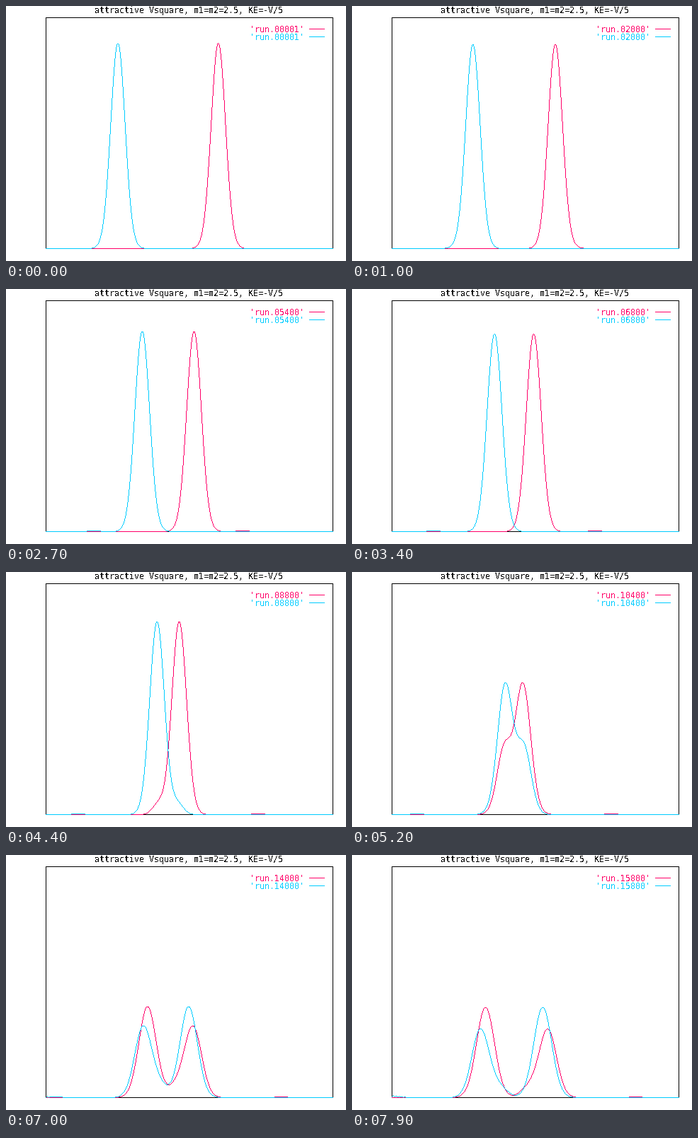
A matplotlib script that plays this animation: 480 by 360 pixels, repeating every 8 s.

```python
import numpy as np
import matplotlib.pyplot as plt
from matplotlib.animation import FuncAnimation
from matplotlib.patches import Rectangle

plt.rcParams["font.family"] = "DejaVu Sans Mono"
plt.rcParams["text.antialiased"] = False

W, H, DPI = 480, 360, 100
FRAMES, INTERVAL = 80, 100
PINK, CYAN = "#ff0068", "#00ccff"
LEFT, RIGHT, TOP, BASE = 56, 461, 16, 342

AREA = 2926             # peak height times width of one packet
START, MID = 299.3, 228.4
SPEED, WIDTH, SPREAD = 1.272, 10.125, 125
WAVE = 0.777            # wave number per pixel
ECHO = 7.9              # area of the faint packet running backwards

cols = np.arange(LEFT, RIGHT + 1)
edges = np.arange(LEFT, RIGHT + 2)
samples = np.arange(LEFT - 1, RIGHT + 2)


def gauss(x, area, centre, width):
    return area / width * np.exp(-((x - centre) / width) ** 2 / 2)


def ease(t, a, b):
    u = np.clip((t - a) / (b - a), 0, 1)
    return u * u * (3 - 2 * u)


def spread(t):
    return WIDTH * np.hypot(1, t / SPREAD)


def packet(x, t):
    """Density of the particle that comes in from the right."""
    late = (t - 60) / 19
    through = ease(t, 40.5, 60) * (0.517 + 0.031 * late)
    back = ease(t, 45, 60) * (0.410 - 0.015 * late)
    tail = ease(t, 46, 60) * (0.073 - 0.016 * late)
    rest = max(0, 1 - through - back - tail) if t < 60 else 0

    y = np.zeros(len(x))
    if rest:
        centre = START - SPEED * t
        if t > 40:
            centre = np.interp(t, [40, 44, 52, 60], [START - SPEED * 40, 244, 240, 239])
        width = min(spread(t), np.interp(t, [36, 44, 60], [10.55, 10.3, 10]))
        y += gauss(x, AREA * rest, centre, width)
    if through:
        y += gauss(x, AREA * through,
                   np.interp(t, [40, 44, 52, 60, 79], [216, 215, 214.5, 212, 188]),
                   np.interp(t, [44, 54, 60, 79], [8, 10.8, 11.7, 12.6]))
    if back:
        y += gauss(x, AREA * back,
                   np.interp(t, [45, 52, 60, 79], [243, 245.5, 250, 276]),
                   np.interp(t, [45, 60, 79], [10.5, 11.7, 12.1]))
    if tail:
        y += gauss(x, AREA * tail, np.interp(t, [46, 60, 79], [228, 230, 250]), 11.8)
    return y


def echo(x, t, centre, wall):
    """Faint packet, with the fringes of its reflection at the wall."""
    a = gauss(x, ECHO, centre, spread(t))
    b = gauss(x, ECHO, 2 * wall - centre, spread(t))
    return a + b - 2 * np.sqrt(a * b) * np.cos(2 * WAVE * (x - wall))


def pixel_line(y):
    """First and last pixel edge of a one pixel line in each column."""
    rows = BASE - y
    mid = (rows[:-1] + rows[1:]) / 2
    own = rows[1:-1]
    lo = np.minimum(np.minimum(mid[:-1], mid[1:]), own)
    hi = np.maximum(np.maximum(mid[:-1], mid[1:]), own)
    lo, hi = np.floor(lo + 0.5), np.floor(hi + 0.5)
    return lo, np.maximum(hi, lo + 1)


fig = plt.figure(figsize=(W / DPI, H / DPI), dpi=DPI, facecolor="white")
ax = fig.add_axes([0, 0, 1, 1])
ax.axis("off")


def box(x, y, w, h, color):
    ax.add_patch(Rectangle((x, y), w, h, fc=color, lw=0, antialiased=False))


def label(x, y, text, color):
    return ax.text(x, y, text, color=color, fontsize=8.37, va="baseline")


def curve(color, z):
    return ax.stairs(np.full(len(cols), BASE + 1), edges,
                     baseline=np.full(len(cols), BASE), fill=True, color=color,
                     lw=0, antialiased=False, snap=False, zorder=z)


box(LEFT, TOP, RIGHT - LEFT + 1, BASE - TOP + 1, "black")
box(LEFT + 1, TOP + 1, RIGHT - LEFT - 1, BASE - TOP - 1, "white")
label(125, 10, "attractive Vsquare, m1=m2=2.5, KE=-V/5", "black")
keys = [label(344, 37, "", PINK), label(344, 48, "", CYAN)]
box(428, 32, 22, 1, PINK)
box(428, 43, 22, 1, CYAN)
pink, cyan = curve(PINK, 3), curve(CYAN, 4)
ax.set_xlim(0, W)
ax.set_ylim(H, 0)


def draw(i):
    drift = SPEED * i
    right = packet(samples, i) + echo(samples, i, START + drift, RIGHT)
    left = packet(2 * MID - samples, i) + echo(samples, i, 2 * MID - START - drift, LEFT)
    for line, y in ((pink, right), (cyan, left)):
        lo, hi = pixel_line(y)
        line.set_data(values=hi, edges=edges, baseline=lo)
    for key in keys:
        key.set_text(f"'run.{max(1, 200 * i):05d}'")
    return pink, cyan, *keys


anim = FuncAnimation(fig, draw, frames=FRAMES, interval=INTERVAL, repeat=True,
                     repeat_delay=0)
plt.show()
```
